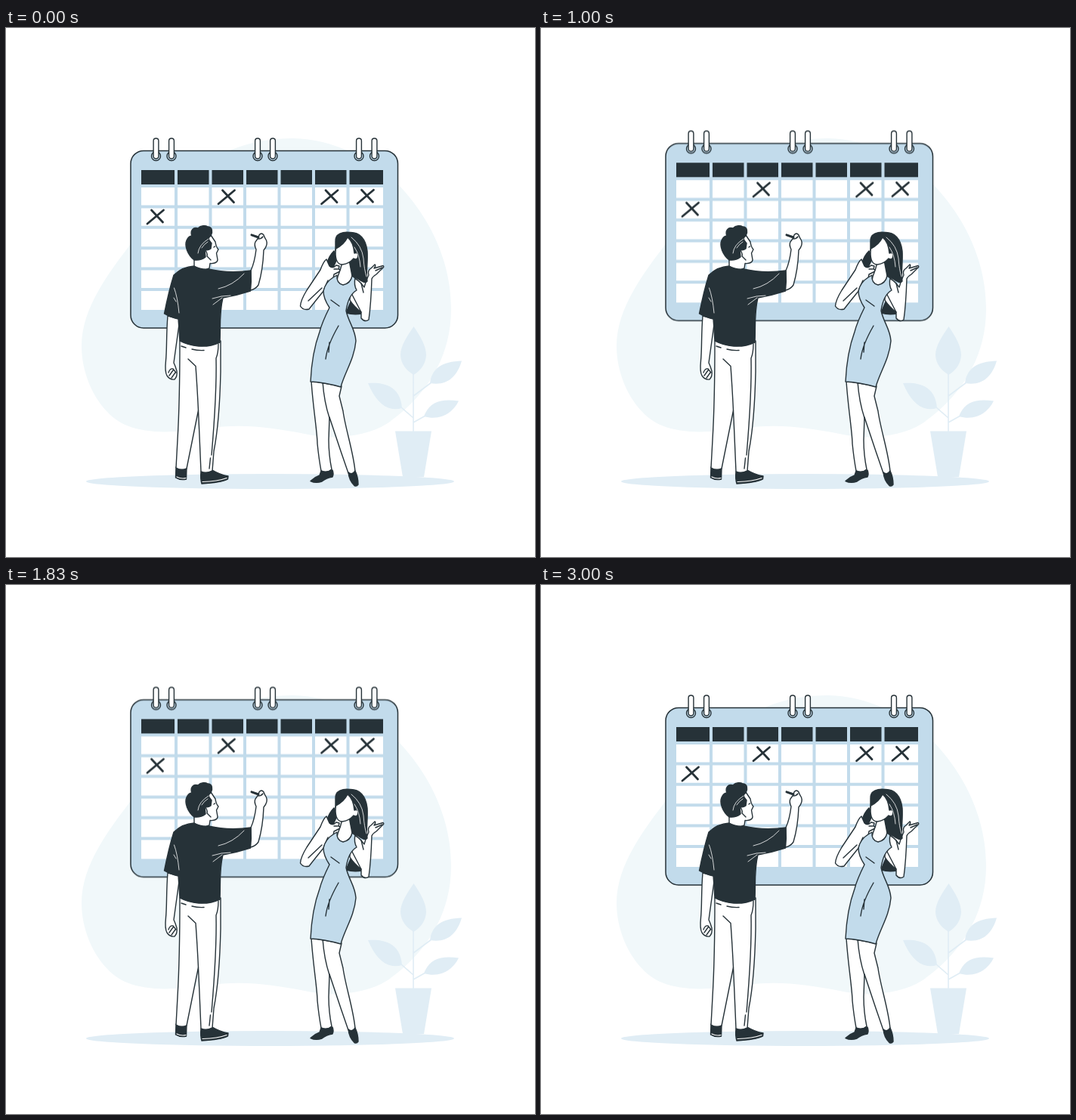
Recreate the animation shown at these times as an HTML page. Size 700x700 px, loop 3040 ms.

```html
<!DOCTYPE html>
<html lang="en">
<head>
<meta charset="utf-8">
<title>Planning calendar</title>
<style>
  html, body { margin: 0; width: 100%; height: 100%; overflow: hidden; background: #fff; }
  svg { display: block; width: 100vw; height: 100vh; }
  .ink { fill: none; stroke: #263238; stroke-width: 1.4; stroke-linecap: round; stroke-linejoin: round; }
  .white { fill: #fff; }
  .dark { fill: #263238; }
  .blue { fill: #c2dbeb; }
  .pale { fill: #e0edf5; }
  .light { fill: none; stroke: #fff; stroke-width: .8; stroke-linecap: round; }
  .grid { fill: none; stroke: #c2dbeb; stroke-width: 4; }
  .mark { fill: none; stroke: #263238; stroke-width: 2.8; stroke-linecap: round; }
  .calendar { animation: float 3040ms linear infinite; }
  @keyframes float {
    0%, 98.2%, 100% { transform: translateY(0); }
    47.7% { transform: translateY(-14.1px); }
  }
</style>
</head>
<body>
<svg viewBox="0 0 700 700">
  <defs>
    <g id="ring" class="ink">
      <circle class="blue" cy="169.5" r="6"/>
      <rect class="white" x="-3.4" y="146" width="6.8" height="27" rx="3.4"/>
    </g>
    <path id="cross" class="mark" d="M-11 9.500 10.500-8.500M-5.500-8.500 9.500 7.500"/>
  </defs>

  <path fill="#f1f8fa" d="M100 421C100 370 137 323 164 287C215 215 270 146 380 146C440 147 492 180 519 207C562 252 589 310 589 372C589 440 552 490 505 523C475 542 430 545 395 537C350 528 310 523 265 530C225 535 190 538 160 526C125 512 100 465 100 421Z"/>
  <ellipse class="pale" cx="349.5" cy="600" rx="243.5" ry="10"/>

  <g class="pale">
    <path d="M515 533.5H563L553 594H525Z"/>
    <path d="M539.5 395C548 408 556 420 556 433Q555 449 539.5 459Q523 449 522 433C522 420 531 408 539.5 395Z"/>
    <path d="M561 470C563 451 577 441 603 440.500C597 461 584 474 561 470Z"/>
    <path d="M479 470C502 468 522 475 524 503C507 508 491 499 479 470Z"/>
    <path d="M553 514C560 495 575 490 599 493.500C591 510 574 520 553 514Z"/>
    <path fill="none" stroke="#e0edf5" stroke-width="1.6" d="M539 450V534M539 487 563 469M523 502 539 516M539 522 555 513"/>
  </g>

  <g class="calendar">
    <rect class="ink" x="165" y="162.400" width="353.500" height="234.600" rx="17" style="fill:#c2dbeb;stroke-width:1.5"/>
    <rect class="white" x="179" y="188" width="320" height="185"/>
    <rect class="dark" x="179" y="188" width="320" height="20"/>
    <path class="grid" d="M225 187v187m45.500-187v187m45.500-187v187m45.500-187v187m45.500-187v187m45.500-187v187"/>
    <path class="grid" d="M178 209h322m-322 27.400h322m-322 27.400h322m-322 27.400h322m-322 27.400h322m-322 27.400h322"/>
    <use href="#cross" x="292" y="223.200"/>
    <use href="#cross" x="428.500" y="223.200"/>
    <use href="#cross" x="476" y="222.800"/>
    <use href="#cross" x="198" y="249.500"/>
    <use href="#ring" x="198.500"/>
    <use href="#ring" x="219"/>
    <use href="#ring" x="333"/>
    <use href="#ring" x="353"/>
    <use href="#ring" x="467"/>
    <use href="#ring" x="487.500"/>
  </g>

  <!-- man -->
  <g class="ink">
    <path class="white" d="M214 381C212 405 213 425 211.500 440Q210 455 213 460Q217 466 223 465Q227 461 226 454Q224 447 222 443L230 385Z"/>
    <path d="M215 456Q217 450 221 451L225 456M216 460 221 453M219 463 224 456"/>
    <path class="dark" d="M225 581Q232 585 239 582L238.500 597Q231 599 224.500 595Z"/>
    <path class="dark" d="M258 587Q266 590 273 585Q283 591 294 593L293.500 597Q284 602 259 603Q257 596 258 587Z"/>
    <path style="stroke:#fff;stroke-width:1.2" d="M226 594Q232 597 238 595.500M260 600.500Q280 600 292 595.500"/>
    <path class="white" d="M230 414C230 450 230 495 227 545L225 582Q232 586 239 583L254.500 506L256 540L258 587Q265 590 273 586L275 560C281 530 283 500 284 455V414Z"/>
    <path d="M241 438 251 447.500Q253 475 254.500 506M246 425Q254 427 262 426.500M232 421 238 423M281 418Q281 430 278 437M278 437C279 480 275 530 272 565M270.500 569 269 583"/>
    <path class="white" d="M324 321Q329 310 331 293Q328 287 330 283Q334 279 335 274Q338 270 341 274Q342 277 344.500 281Q347 287 341 294Q340 320 334 340Q330 346 323 347Z"/>
    <path d="M334 279Q338 279 340 276"/>
    <path style="stroke-width:3" d="M325 273.800 334 277"/>
    <path class="white" d="M249 298V317Q259 323 269 318L270 311.500C276 312 280 310 280 306.500L278.500 298L281 293Q278 290 277 283L271 274L255 280Z"/>
    <path class="dark" d="M249 307C240 300 236 288 239 281Q242 275 246 275C243 268 248 263 254 265C258 261 264 261 267 263C273 263 274 270 271 275Q267 277 269 281L272 285L271 292Q267 295 263 293L264 303Q258 308 249 307Z"/>
    <path d="M264 294Q267 299 266 302L271 307M275 290 276.500 289"/>
    <path class="dark" d="M249 315Q258 320 268 319C285 323 303 324 324 321Q325 335 323.500 348Q305 354 287 357C282 377 284 396 283 416Q270 422 255 421Q241 420 230 414Q229 398 228 385Q218 383 209.500 378C213 360 217 343 222 327Q233 316 249 315Z"/>
  </g>
  <path class="light" d="M254 298Q255 287 268 279M259 291Q262 286 267 283M222.500 344Q227 356 229 377M222 357 225 362M281 345Q300 341 315 325M273 358Q285 354 297 354M274 366 286 357"/>

  <!-- woman -->
  <g class="ink">
    <path class="dark" d="M457 360Q453 369 450 377Q460 380 471 378V362Z"/>
    <path class="white" d="M404 467C406 500 412 535 412 550Q414 570 417 586Q424 590 431 584Q427 565 427 545L428 515L443 560L453 589Q458 592 462 587C460 562 449 530 446 507L441 487L444 474Z"/>
    <path d="M419 468Q421 495 428 516"/>
    <path class="dark" d="M417 586Q424 589 432 585Q434 590 432 594Q424 595 418 600Q410 603 403 599.500Q409 594 415 592Z"/>
    <path class="dark" d="M453 588Q458 592 462 586Q466 594 466 604Q464 607 461 605.500Q454 599 453 588Z"/>
    <path class="white" d="M455 329Q464 331 470 338L474 343Q477 333 480 327Q478 321 483 318L488 313Q490 314 487 318L499 314.500Q501 316 498 318L490 326Q485 329 484 332Q483 365 480 386Q475 390 470 384L470 376Q460 368 455 360Z"/>
    <path d="M457 351 470 376M470 338 473 350M489 321 498 317"/>
    <path class="dark" d="M436 283C435 272 446 269.500 455 270.500C468 270 476 279 478 295C479 312 476 324 478 335Q475 339 466 332L455 327L436 295Z"/>
    <path class="dark" d="M434 295Q437 299 437 308L432 319Q425 317 425 311Q427 302 434 295Z"/>
    <path class="white" d="M433 331Q426 334 421 347Q412 358 401 372Q393 374 389.500 368Q390 360 398 347L416 320Q420 309 424 306L428 315Q432 319 437 314L441 315L440 319L444 321Q438 324 434 326Z"/>
    <path d="M421 345 426 334M434 319 439 319M400 361 418 344"/>
    <path class="white" d="M445 310Q443 319 439 329Q436 339 444 342Q457 342 458 328L454 307Z"/>
    <path class="blue" d="M433 330 438 327Q437 338 446 340Q456 338 458 328L462 331Q460 340 464 347C457 351 452 360 450 374C453 389 462 398 463 414C461 438 448 456 443 475Q422 469 403 468C404 446 408 421 415 402Q418 390 428 370Q420 358 420 348Q423 336 433 330Z"/>
    <path d="M430 360 441 368M440 394Q425 420 423 438M428 416 427 429"/>
    <path class="white" d="M436.500 292C435 303 437 313 445 313Q454 312 460 305Q465 308 466 301Q465 296 461 298C460 287 457 281 452 277Q447 287 436.500 292Z"/>
  </g>
  <path class="light" d="M457 277Q471 288 473 305Q474 320 477 329M461 290Q468 300 469 316"/>
</svg>
</body>
</html>
```
